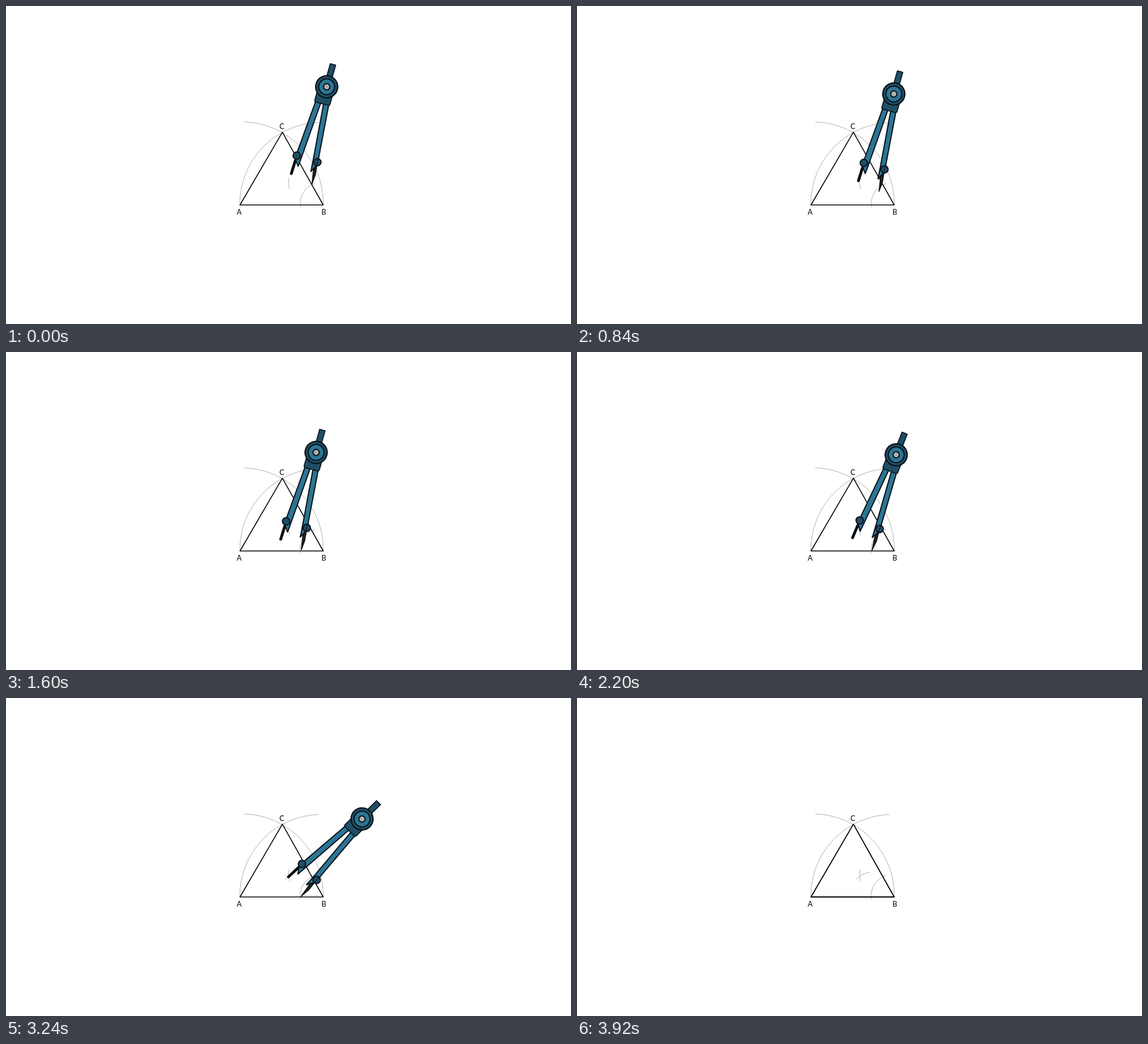
Animation, 998 px wide and 561 px high, one loop 3.96 s. Source, as an HTML page:

```html
<!DOCTYPE html>
<html lang="en">
<head>
<meta charset="utf-8">
<title>Compass construction</title>
<style>
  html, body { margin: 0; width: 100%; height: 100%; overflow: hidden; background: #fff; }
  svg { display: block; width: 998px; height: 561px; }
  text { font: 12.8px Lato, "Open Sans", sans-serif; text-anchor: middle; }
  .arc { fill: none; stroke: #999; stroke-width: .8; }
  #triangle { fill: none; stroke: #000; stroke-linejoin: round; }
  #compass { stroke: #0a0f14; stroke-width: 2; stroke-linejoin: round; }
  .dark { fill: #1f4e66; }
  .light { fill: #2c7595; }
</style>
</head>
<body>
<svg viewBox="0 0 998 561">
  <clipPath id="wipe"><rect id="wipeBox" x="480" y="300" height="30"/></clipPath>
  <g class="arc">
    <path d="M421 204.5A144 144 0 0 1 560.5 350.5"/>
    <path d="M413 350.5A144 144 0 0 1 552 205.5"/>
    <path d="M520.2 355.5A37.5 37.5 0 0 1 546 313"/>
    <path d="M500 303Q497.5 313 501 323"/>
    <path d="M493 320Q503 309 518 307" clip-path="url(#wipe)"/>
  </g>
  <path id="triangle" d="M413.3 351H560.3L488.2 222.6Z"/>
  <text x="411.8" y="367.8">A</text>
  <text x="561.3" y="367.8">B</text>
  <text x="487.4" y="217">C</text>

  <g id="compass">
    <path d="M511 273L504 295.5" stroke-width="5" stroke-linecap="round"/>
    <path class="light" d="M547 168L556 171L519.5 274L516 283L510.5 268.5Z"/>
    <path fill="#222" stroke-width="1.4" d="M543 289L549 283L546.5 298L540.3 314.5Z"/>
    <path class="light" d="M561 172L570 175L550 280L538.5 292L542.5 272Z"/>
    <circle class="dark" cx="513.5" cy="264" r="6.5"/>
    <circle class="dark" cx="550" cy="275.5" r="6.5"/>
    <path d="M551 270L549 281" stroke-width="1.2"/>
    <g transform="translate(566.5 142.5) rotate(15.7)">
      <rect class="dark" x="-5" y="-41" width="10" height="30" stroke-width="1.6"/>
      <rect class="dark" x="-14" y="5" width="28" height="26" rx="3" stroke-width="1.6"/>
      <circle class="dark" r="19.5" stroke-width="2.2"/>
      <circle class="light" r="14"/>
      <circle r="5.5" fill="#b0b0ae"/>
    </g>
  </g>
</svg>
<script>
const LOOP = 3960, STEP = 40, REMOVED = 3920;
const needle = { x: 540.3, y: 314.5 }, pivot = { x: 521.1, y: 350 };
const pencil = { radius: 40.9, angle: -64.7 };
const byId = id => document.getElementById(id);
const progress = (t, start, length) => Math.min(1, Math.max(0, (t - start) / length));
const smooth = u => u * u * (3 - 2 * u);

function draw(now) {
  const t = Math.floor(now % LOOP / STEP) * STEP;
  const slide = smooth(progress(t, 230, 1510));
  const turn = 45 * progress(t, 1960, 1945);
  const done = t >= REMOVED;
  const x = (pivot.x - needle.x) * slide, y = (pivot.y - needle.y) * slide;

  byId('compass').setAttribute('transform',
    `translate(${x} ${y}) rotate(${turn} ${needle.x} ${needle.y})`);
  byId('compass').style.display = done ? 'none' : '';
  byId('triangle').style.strokeWidth = done ? 1.8 : 1.6;

  // The new arc is uncovered as far as the pencil has come.
  const pencilX = pivot.x + pencil.radius * Math.sin((pencil.angle + turn) * Math.PI / 180);
  const drawn = done ? 60 : turn > 20 ? pencilX + 1 - 480 : 0;
  byId('wipeBox').setAttribute('width', drawn);
}

function tick() {
  draw(performance.now());
  requestAnimationFrame(tick);
}
tick();
</script>
</body>
</html>
```
